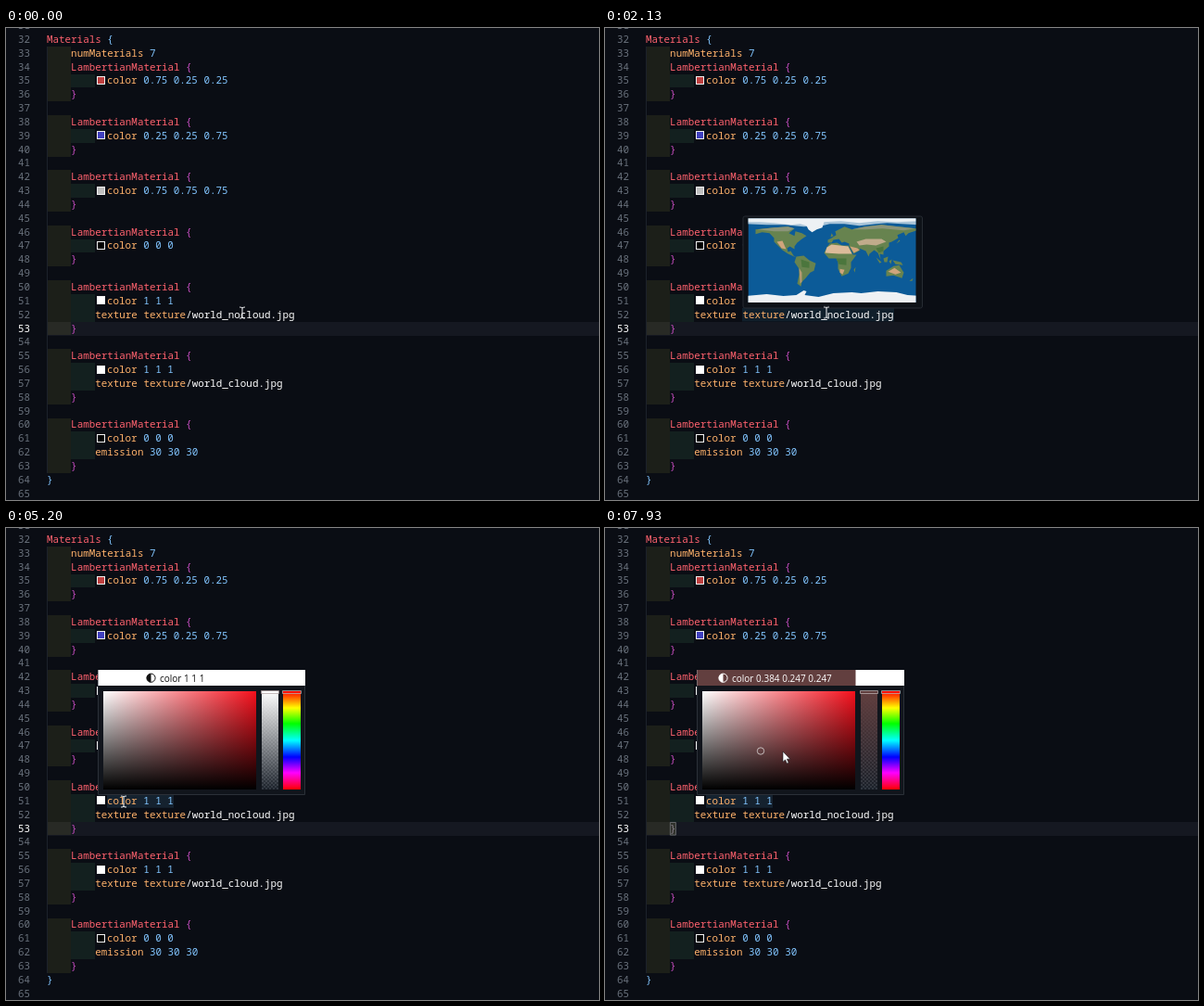
An HTML page that plays this animation: 640x509 px, repeating every 8 s.

```html
<!DOCTYPE html>
<html lang="en">
<head>
<meta charset="utf-8">
<title>Material editor</title>
<style>
  html, body { margin: 0; width: 100%; height: 100%; overflow: hidden; background: #0a0d14; }
  svg { display: block; width: 640px; height: 509px; }
  .code text { font: 10.88px "Noto Sans Mono", "DejaVu Sans Mono", monospace; white-space: pre; }
  .label { font: 10px "Open Sans", "Noto Sans", sans-serif; }
  .type { fill: #ff626e; }
  .key { fill: #ffb26b; }
  .num { fill: #82c5ff; }
  .path { fill: #fff; }
  .outer { fill: #82c5ff; }
  .inner { fill: #c94fc4; }
  .line { fill: #6a727d; }
  .code .active { fill: #fff; font-weight: 500; }

  .map, .picker, .plain, .picked, .beam, .hand, .arrow { animation: 8s step-end infinite; }
  .map { animation-name: map; }
  .picker { animation-name: picker; }
  .plain { animation-name: plain; }
  .picked { animation-name: picked; }
  .beam { animation-name: beam; }
  .hand { animation-name: hand; }
  .arrow { animation-name: arrow; }
  .pointer { animation: move 8s ease-in-out infinite; }

  @keyframes map { 0% { opacity: 0 } 5.8% { opacity: 1 } 28.3% { opacity: 0 } 81.6% { opacity: 1 } 88.3% { opacity: 0 } }
  @keyframes picker { 0% { opacity: 0 } 58.3% { opacity: 1 } 79.1% { opacity: 0 } 90.8% { opacity: 1 } }
  @keyframes plain { 0% { opacity: 1 } 97.5% { opacity: 0 } }
  @keyframes picked { 0% { opacity: 0 } 97.5% { opacity: 1 } }
  @keyframes beam { 0% { opacity: 1 } 85% { opacity: 0 } }
  @keyframes hand { 0% { opacity: 0 } 85% { opacity: 1 } 91.6% { opacity: 0 } }
  @keyframes arrow { 0% { opacity: 0 } 91.6% { opacity: 1 } }
  @keyframes move {
    0% { transform: translate(255px, 307px) }
    5%, 25% { transform: translate(250px, 309px) }
    33%, 40% { transform: translate(121px, 283px) }
    50%, 72% { transform: translate(127px, 295px) }
    77%, 81% { transform: translate(159px, 316px) }
    86.2%, 90% { transform: translate(104px, 296.3px) }
    96%, 97.5% { transform: translate(168px, 240px) }
    99%, 100% { transform: translate(192px, 241px) }
  }
</style>
</head>
<body>
<svg viewBox="0 0 640 509">
  <defs>
    <linearGradient id="tint"><stop stop-color="#fff"/><stop offset="1" stop-color="#f5101c"/></linearGradient>
    <linearGradient id="shade" x2="0" y2="1"><stop stop-opacity="0"/><stop offset="1"/></linearGradient>
    <linearGradient id="whiteFade" x2="0" y2="1"><stop stop-color="#fff"/><stop offset="1" stop-color="#fff" stop-opacity="0"/></linearGradient>
    <linearGradient id="brownFade" x2="0" y2="1"><stop stop-color="#623f3f"/><stop offset="1" stop-color="#623f3f" stop-opacity="0"/></linearGradient>
    <linearGradient id="hue" x2="0" y2="1">
      <stop stop-color="#f00"/><stop offset=".17" stop-color="#ff0"/><stop offset=".33" stop-color="#0f0"/>
      <stop offset=".5" stop-color="#0ff"/><stop offset=".67" stop-color="#00f"/>
      <stop offset=".83" stop-color="#f0f"/><stop offset="1" stop-color="#f00"/>
    </linearGradient>
    <pattern id="checks" width="4" height="4" patternUnits="userSpaceOnUse">
      <path fill="#1a2029" d="M0 0h4v4h-4z"/><path fill="#30363f" d="M0 0h2v2h-2zM2 2h2v2h-2z"/>
    </pattern>
    <clipPath id="frame"><path d="M0 0h181v90H0z"/></clipPath>
    <filter id="soften"><feGaussianBlur stdDeviation=".5"/></filter>
  </defs>

  <path fill="#0a0d14" d="M0 0h640v509H0z"/>
  <path fill="#151821" d="M44 317h596v15H44z"/>
  <g id="indents" shape-rendering="crispEdges"></g>
  <path stroke="#1c222b" d="M44.5 20V480"/>
  <path class="map" fill="#101f2b" d="M148 302h164v14.5h-164z"/>
  <path class="picker" fill="#15222f" d="M109 287.3h72v14.5h-72z"/>
  <g id="code" class="code"></g>
  <g class="picked code">
    <path fill="#30322c" stroke="#74777a" stroke-width=".8" d="M70.4 317.5h6v13.6h-6z"/>
    <text x="70.1" y="327.6" fill="#8d8490">}</text>
  </g>

  <g class="map">
    <rect x="149" y="203" width="193.5" height="99" rx="2" fill="#0e1218" stroke="#262b32"/>
    <g transform="translate(154.5 205.2) scale(1 1.009)" clip-path="url(#frame)">
      <path fill="#0c5b98" d="M0 0h182v90H0z"/>
      <g filter="url(#soften)">
        <path fill="#a9c4d8" d="M-3-3H185V7L166 6 150 5 138 6 120 8 104 6 88 6 80 8 60 9 40 7 20 7-3 6z"/>
        <path fill="#edf1f4" d="M-3-3H185V3L160 4 140 3 120 5 100 3 82 4 80 10 74 12 69 15 65 12 63 8 56 6 46 7 28 5 12 4-3 4z"/>
        <g fill="#67834f">
          <path d="M8 12 28 10 43 9 50 11 44 16 50 19 51 14 58 16 63 19 58 22 53 26 50 30 50 33 45 30 42 32 43 36 46 35 49 40 52 42 43 38 37 34 33 30 28 25 28 21 23 16 15 15 8 17z"/>
          <path d="M52 41 60 40 66 45 73 48 71 56 67 58 62 64 58 68 57 73 53 70 55 60 55 54 50 47z"/>
          <path d="M88 27 96 26 101 29 108 29 113 39 117 39 111 47 111 53 108 59 101 62 97 54 97 47 95 43 87 43 82 37 85 31z"/>
          <path d="M86 23 90 21 95 18 94 14 104 9 112 12 126 9 144 7 162 9 182 11V13L173 16 170 19 168 15 161 18 162 21 155 25 152 26 152 30 146 35 146 39 142 38 143 44 140 37 136 34 131 38 130 41 127 35 120 32 121 34 114 38 109 30 109 27 104 25 101 26 98 22 92 23 90 26 86 26z"/>
          <path d="M149 56 157 51 163 50 168 58 166 64 157 61 149 62z"/>
          <path d="M138 42 144 47 142 48zM146 43 151 41 150 47 147 47zM156 45 165 47 167 50 159 49zM160 27 163 23 164 24zM114 55 116 52 115 58zM89 20 90 16 92 19zM174 67 178 64 177 67zM152 46 155 44 154 49z"/>
        </g>
        <path fill="#8b9479" d="M10 12 28 10 43 9 50 11 43 14 28 14zM112 12 126 9 144 7 162 9 180 11 168 13 145 11 126 12z"/>
        <path fill="#dcbb9a" d="M85 31 90 28 108 30 112 38 98 38 83 37z"/>
        <path fill="#cfa47c" d="M110 30 118 32 120 34 114 37zM151 57 158 53 165 58 159 60zM31 25 37 24 41 33 36 32zM99 54 104 55 102 60 99 58z"/>
        <path fill="#c0ab8b" d="M117 25 127 22 144 22 149 25 138 29 128 28 120 29z"/>
        <path fill="#b59a72" d="M55 53 58 58 58 68 56 70z"/>
        <path fill="#4b763d" d="M57 44 66 47 66 53 58 52zM95 43 106 43 106 50 98 49zM138 32 146 30 146 35 141 37z"/>
        <path fill="#eef1f4" d="M-3 83 20 81 38 83 52 82 60 77 63 78 61 82 76 84 92 80 112 79 122 80 140 78 160 79 172 82 185 83V93H-3z"/>
      </g>
    </g>
  </g>

  <g class="picker">
    <path fill="#11151c" stroke="#2b3038" d="M99.5 153.5H322.5V287.5H99.5z"/>
    <path fill="#fff" d="M99.5 153H323v17H99.5z"/>
    <path fill="url(#tint)" d="M105 176h165v106H105z"/>
    <path fill="url(#shade)" d="M105 176h165v106H105z"/>
    <path fill="url(#checks)" d="M276 176h18v106h-18z"/>
    <path fill="url(#hue)" d="M299 176h19v106h-19z"/>
    <g class="plain">
      <path fill="url(#whiteFade)" d="M276 176h18v106h-18z"/>
      <circle cx="156.5" cy="161.7" r="4.6" fill="none" stroke="#111"/>
      <path fill="#111" d="M156.5 157a4.6 4.6 0 0 0 0 9.4z"/>
      <text class="label" x="166" y="165.5" fill="#111">color 1 1 1</text>
    </g>
    <g class="picked">
      <path fill="#623f3f" d="M99.5 153H270.5v17H99.5z"/>
      <path fill="url(#brownFade)" d="M276 176h18v106h-18z"/>
      <circle cx="127.5" cy="161.7" r="4.6" fill="none" stroke="#fff"/>
      <path fill="#fff" d="M127.5 157a4.6 4.6 0 0 0 0 9.4z"/>
      <text class="label" x="137" y="165.5" fill="#fff">color 0.384 0.247 0.247</text>
      <circle cx="168" cy="240.5" r="3.7" fill="none" stroke="#d0c8c8" stroke-width=".9"/>
    </g>
    <path fill="none" stroke="#b9aaaa" stroke-width=".8" d="M275.5 175.5h19v3h-19zM298.5 175.5h20v3h-20z"/>
  </g>

  <g class="pointer">
    <path class="beam" fill="none" stroke="#e2e4e6" stroke-width="1.1" d="M-3-6Q0-6 0-4.5Q0-6 3-6M0-5V5M-3 6Q0 6 0 4.5Q0 6 3 6"/>
    <path class="hand" fill="#fff" stroke="#16191f" stroke-width=".7" d="M-1.4 0Q0-1.6 1.3 0V4.3Q2.6 3.6 3.5 4.8Q5 4.3 5.6 5.7Q7.4 5.5 7.4 7.3V10.5Q7 12.5 5.8 14H.2Q-1.2 11.2-4 8.8Q-3.8 6.8-1.4 8.3z"/>
    <path class="arrow" fill="#fff" stroke="#16191f" stroke-width=".6" d="M0 0V11.2L2.6 8.9 4.4 13 6.2 12.2 4.4 8.2H7.8z"/>
  </g>
</svg>
<script>
  const FIRST = 31, LAST = 65, ACTIVE = 53;
  const ROW = 14.84, CHAR = 10.88 * 0.6, LEFT = 44;
  const rowTop = line => 4.98 + (line - 32) * ROW;

  const material = (...body) => [[1, "LambertianMaterial {"], ...body.map(s => [2, s]), [1, "}"]];
  const blank = [0, ""];
  const rows = [
    blank, [0, "Materials {"], [1, "numMaterials 7"],
    ...material("color 0.75 0.25 0.25"), blank,
    ...material("color 0.25 0.25 0.75"), blank,
    ...material("color 0.75 0.75 0.75"), blank,
    ...material("color 0 0 0"), blank,
    ...material("color 1 1 1", "texture texture/world_nocloud.jpg"), blank,
    ...material("color 1 1 1", "texture texture/world_cloud.jpg"), blank,
    ...material("color 0 0 0", "emission 30 30 30"),
    [0, "}"], blank
  ];

  const span = (kind, s) => `<tspan class="${kind}">${s}</tspan>`;
  const paint = (text, depth) => text.replace(/[A-Z]\w+|\/\S+|[a-z]\w+|[\d.]+|[{}]/g, word => {
    if (/[{}]/.test(word)) return span(depth ? "inner" : "outer", word);
    if (/^[A-Z]/.test(word)) return span("type", word);
    if (word[0] === "/") return span("path", word);
    return span(/^\d/.test(word) ? "num" : "key", word);
  });
  const rect = (x, y, w, h, fill, extra = "") =>
    `<rect x="${x}" y="${y}" width="${w}" height="${h}" fill="${fill}" ${extra}/>`;

  let bands = "", code = "";
  for (let line = FIRST; line <= LAST; line++) {
    const [depth, text] = rows[line - FIRST];
    const top = rowTop(line), base = top + 10.9, indent = 4 * CHAR;
    const active = line === ACTIVE;
    let x = LEFT + depth * indent;

    if (depth > 0) bands += rect(LEFT, top, indent, ROW, active ? "#282a25" : "#1c1f19");
    if (depth > 1) bands += rect(LEFT + indent, top, indent, ROW, "#13201f");

    code += `<text class="${active ? "active" : "line"}" x="26" y="${base}" text-anchor="end">${line}</text>`;
    if (text.startsWith("color")) {
      const rgb = text.split(" ").slice(1).map(v => v * 255);
      code += rect(98.5, Math.floor(top + 3) + 0.5, 8, 8, `rgb(${rgb})`, 'stroke="#f0f0f0"');
      x = 109;
    }
    code += `<text x="${x}" y="${base}">${paint(text, depth)}</text>`;
  }
  document.getElementById("indents").innerHTML = bands;
  document.getElementById("code").innerHTML = code;
</script>
</body>
</html>
```
